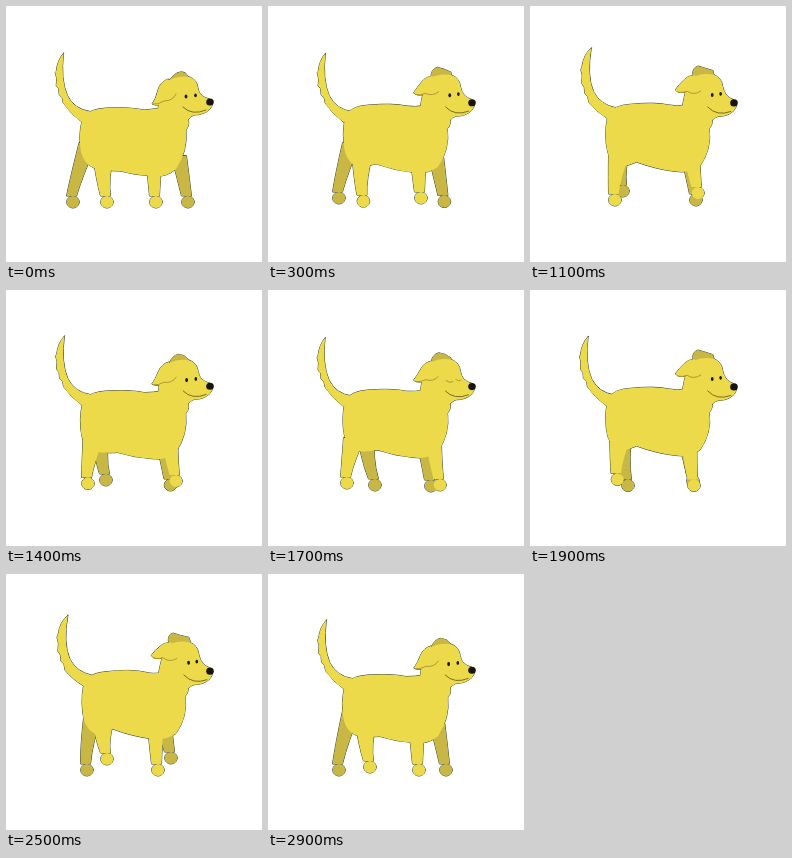
An HTML page with a canvas for the animation above (3 s loop, 256 px wide and 256 px high).

```html
<!DOCTYPE html>
<html lang="en">
<head>
<meta charset="utf-8">
<title>Walking dog</title>
<style>
  html, body { margin: 0; height: 100%; overflow: hidden; background: #fff; }
  canvas { display: block; }
</style>
</head>
<body>
<canvas id="stage" width="256" height="256"></canvas>
<script>
const ctx = document.getElementById('stage').getContext('2d');
const LOOP = 3000, STEP = 100;
const COAT = '#ecda4b', SHADE = '#c8b645', LINE = '#a8912c', EDGE = '#39452c';

const mix = (a, b, k) => a + (b - a) * k;

// Blend two path strings with the same commands
function morph(low, high, k) {
  const targets = high.match(/[\d.]+/g);
  let i = 0;
  return new Path2D(low.replace(/[\d.]+/g, v => mix(+v, +targets[i++], k)));
}

// Foot keys are [time, x, y]; the hip follows the foot by a fixed ratio
const legs = {
  farBack: {
    hip: x => 82 + (x - 67) * .38, top: 137, width: 18, bend: -3,
    keys: [[0, 67, 196], [300, 71, 192], [700, 86, 187], [1100, 93, 185], [1700, 107, 195],
           [2100, 89, 196], [2500, 81, 196], [2900, 71, 196], [3000, 67, 196]]
  },
  farFront: {
    hip: x => 155 + (x - 162) * .9, top: 150, width: 15, bend: 1,
    keys: [[0, 182, 196], [700, 169, 195], [1100, 166, 194], [1700, 163, 196],
           [2100, 163, 186], [2500, 165, 184], [2900, 178, 196], [3000, 182, 196]]
  },
  nearBack: {
    hip: x => 86 + (x - 79) * .5, top: 148, width: 21, bend: -2,
    keys: [[0, 101, 196], [700, 88, 194], [1100, 85, 194], [1700, 79, 193],
           [2100, 96, 186], [2500, 101, 185], [2900, 102, 193], [3000, 101, 196]]
  },
  nearFront: {
    hip: x => 147 + (x - 149) * .8, top: 152, width: 16, bend: 0,
    keys: [[0, 150, 196], [300, 153, 192], [700, 166, 187], [1100, 168, 187], [1700, 172, 195],
           [2100, 156, 196], [2500, 152, 196], [2900, 151, 196], [3000, 150, 196]]
  }
};

function footAt(keys, t) {
  const i = keys.findIndex(key => key[0] > t);
  const a = keys[i - 1], b = keys[i], k = (t - a[0]) / (b[0] - a[0]);
  return [mix(a[1], b[1], k), mix(a[2], b[2], k)];
}

function legPath({ hip, top, width, bend, keys }, t) {
  const [x, y] = footAt(keys, t);
  const h = hip(x), ankle = x - 1.5, kneeX = (h + ankle) / 2 + bend, kneeY = mix(top, y, .55);
  const path = new Path2D(
    `M${h - width / 2} ${top} Q${kneeX - 6} ${kneeY} ${ankle - 5} ${y - 6}` +
    `L${ankle + 5} ${y - 6} Q${kneeX + 6} ${kneeY} ${h + width / 2} ${top}Z`);
  const foot = new Path2D();
  foot.ellipse(x, y, 6.3, 6, 0, 0, 7);
  path.addPath(foot);
  return path;
}

function dot(x, y, rx, ry) {
  ctx.beginPath();
  ctx.ellipse(x, y, rx, ry, 0, 0, 7);
  ctx.fill();
}

function draw(t) {
  const phase = t / (LOOP / 2) % 1;
  const lift = Math.abs(Math.sin(Math.PI * phase));
  const sway = (1 - Math.cos(2 * Math.PI * (phase - .11))) / 2;
  const pose = (low, high) => morph(low, high, lift);

  const tail = morph(
    'M57 48 Q51 55 50 66 L49 67 L50.5 73 L50 80 L52.5 83 L53 89 L56 92 L57 97 Q64 108 76 117 L84 106 Q68 104 61 90 Q54 74 57 48Z',
    'M62 41 Q54 47 52 61 L51 63 L52.5 69 L52 77 L54.5 81 L55 87 L58 90 L59 96 Q66 105 78 112 L86 101 Q71 98 64 85 Q57 69 62 41Z', sway);
  const farEar = pose(
    'M163 75 Q168 67 174 66 Q180 65 183 72 L180 76Z',
    'M163 69 L159 60 Q166 58 173 61 Q183 62 186 70Z');
  const body = pose(
    'M78 110 Q84 103 100 102 Q125 101 138 104 Q148 103 154 102 L181 110 Q185 118 180 124 Q182 145 170 163 Q160 172 146 170 Q128 169 114 165 Q98 165 88 162 Q75 157 74 138 Q73 120 78 110Z',
    'M79 107 Q84 98 100 97 Q125 94 138 97 Q148 100 155 98 L181 111 Q184 117 179 122 Q182 142 170 159 Q160 166 146 164 Q128 162 104 153 Q99 158 92 160 Q79 157 77 138 Q75 118 79 107Z');
  const head = pose(
    'M152 104 Q154 82 161 75 Q172 69 184 71 Q191 74 192 82 Q193 91 204 93 Q209 97 204 103 Q198 109 188 109 Q181 112 179 120Z',
    'M152 102 Q156 80 161 71 Q172 65 184 68 Q192 71 193 80 Q195 91 204 94 Q209 98 204 105 Q198 111 188 111 Q181 113 179 120Z');
  const ear = pose(
    'M162 73 Q154 76 152 84 Q150 93 146 98 Q152 101 160 96 Q168 94 170 86Z',
    'M166 68 Q160 67 155 70 Q149 73 145 79 Q149 84 156 82 Q164 88 171 83Z');
  const crease = pose(
    'M147 98 Q152 99 158 95 Q167 95 170 88',
    'M148 82 Q153 83 157 82 Q163 88 171 84');

  const parts = [
    [tail, COAT], [farEar, SHADE],
    [legPath(legs.farBack, t), SHADE], [legPath(legs.farFront, t), SHADE],
    [body, COAT], [head, COAT], [ear, COAT],
    [legPath(legs.nearBack, t), COAT], [legPath(legs.nearFront, t), COAT]
  ];

  ctx.fillStyle = '#fff';
  ctx.fillRect(0, 0, 256, 256);
  ctx.lineJoin = ctx.lineCap = 'round';

  // All outlines go under the fills, so only the silhouette keeps an edge
  ctx.strokeStyle = EDGE;
  ctx.lineWidth = 1;
  for (const [path] of parts) ctx.stroke(path);
  for (const [path, color] of parts) {
    ctx.fillStyle = color;
    ctx.fill(path);
  }

  ctx.strokeStyle = LINE;
  ctx.lineWidth = .9;
  ctx.stroke(crease);
  ctx.strokeStyle = '#6f6020';
  ctx.stroke(pose('M177 101 Q186 110 200 104', 'M178 101 Q187 111 201 106'));

  ctx.fillStyle = '#17150c';
  dot(204, mix(96, 97.3, lift), 3.8, 3.6);
  const eyeY = mix(90.5, 88.5, lift);
  if (t >= 1600 && t < 1900) {
    ctx.strokeStyle = LINE;
    ctx.stroke(new Path2D(`M178 ${eyeY + 1} q3.5 3 7 1 M188 ${eyeY} q3 2.5 5 .5`));
  } else {
    dot(mix(180, 183, lift), eyeY, 1.4, 2.1);
    dot(mix(189.5, 191, lift), eyeY - 1.2, 1.3, 1.9);
  }
}

function tick() {
  draw(Math.floor(performance.now() % LOOP / STEP) * STEP);
  requestAnimationFrame(tick);
}
tick();
</script>
</body>
</html>
```
